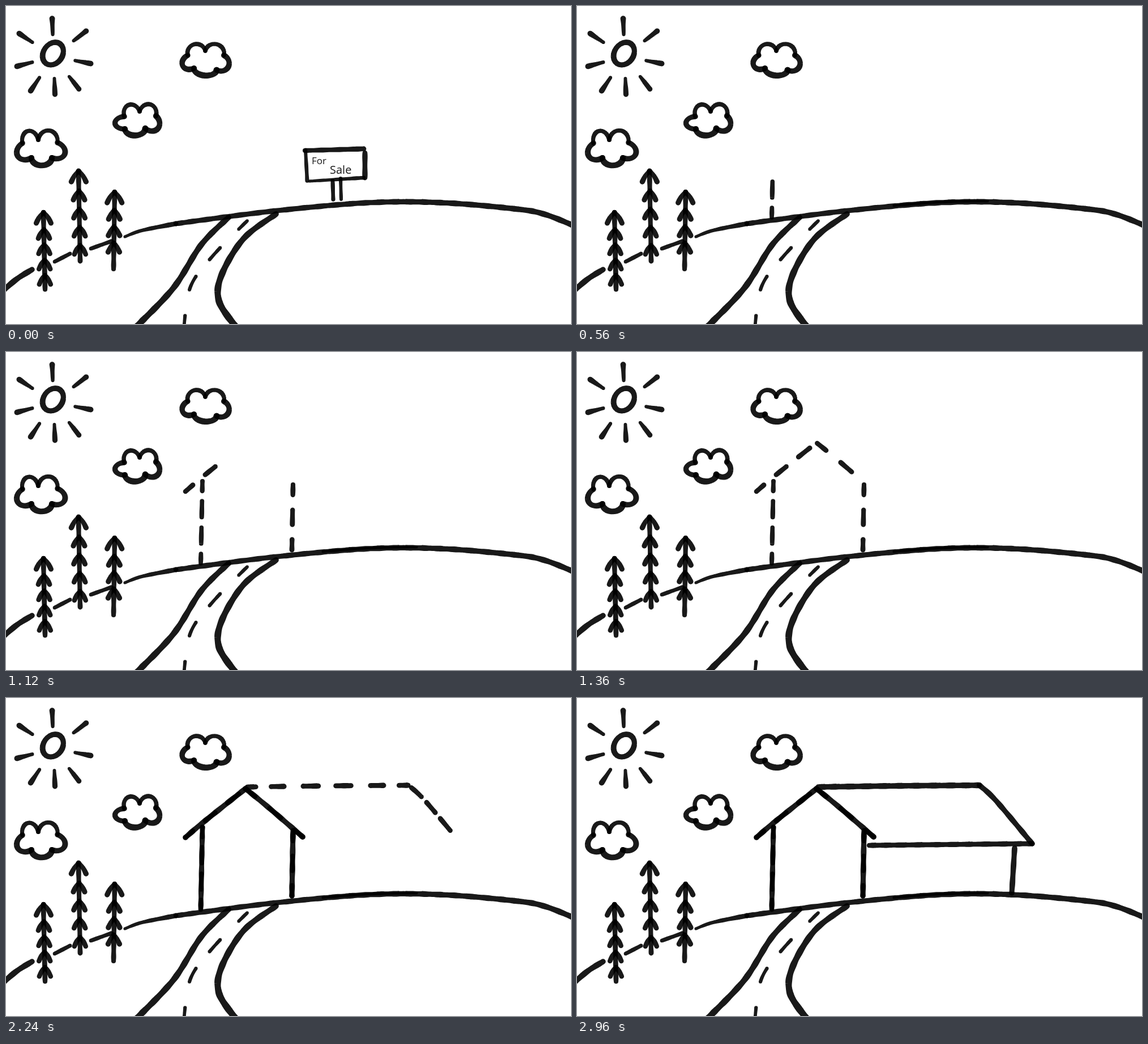
Animation of 998 by 561 pixels, one loop 3060 ms. Source, as an HTML page with a canvas:

```html
<!DOCTYPE html>
<html lang="en">
<head>
<meta charset="utf-8">
<title>House on the hill</title>
<style>
  html, body { margin: 0; width: 998px; height: 561px; overflow: hidden; background: #fff; }
  canvas { display: block; }
</style>
</head>
<body>
<canvas id="stage" width="998" height="561"></canvas>
<script>
const ctx = document.getElementById('stage').getContext('2d');
const LOOP = 3060, STEP = 80, LAST = 37;
const FIRST_DASH = 6, FRONT_DONE = 19, SIGN_GONE = 5;
const INK = 'rgba(0,0,0,.9)';
const { PI, sin, cos, hypot } = Math;

const range = (n, make) => Array.from({ length: n }, (_, i) => make(i));
const parse = text => text.split(' ').map(s => s.split(',').map(Number));

// Catmull-Rom curve through the points of "x,y x,y ..."
function smooth(text) {
  const p = parse(text), out = [];
  for (let i = 0; i < p.length - 1; i++) {
    const a = p[i - 1] || p[i], b = p[i], c = p[i + 1], d = p[i + 2] || c;
    const n = Math.max(2, Math.ceil(hypot(c[0] - b[0], c[1] - b[1]) / 3));
    for (let j = 0; j < n; j++) {
      const t = j / n;
      out.push([0, 1].map(k => b[k] + .5 * t * (c[k] - a[k]
        + t * (2 * a[k] - 5 * b[k] + 4 * c[k] - d[k]
        + t * (3 * (b[k] - c[k]) + d[k] - a[k])))));
    }
  }
  return [...out, p[p.length - 1]];
}

// One pen stroke whose width runs from w0 to w1, with a slight wobble
function pen(pts, w0, w1 = w0) {
  const path = new Path2D(), end = pts.length - 1;
  const radius = i => (w0 + (w1 - w0) * i / end) / 2 * (1 + .05 * sin(i * .7 + pts[0][0]));
  pts.forEach(([x, y], i) => {
    const r = radius(i);
    path.moveTo(x + r, y);
    path.arc(x, y, r, 0, 2 * PI);
    if (i === end) return;
    const [u, v] = pts[i + 1], q = radius(i + 1);
    const len = hypot(u - x, v - y) || 1;
    const nx = (v - y) / len, ny = (x - u) / len;
    path.moveTo(x + nx * r, y + ny * r);
    path.lineTo(u + nx * q, v + ny * q);
    path.lineTo(u - nx * q, v - ny * q);
    path.lineTo(x - nx * r, y - ny * r);
    path.closePath();
  });
  return path;
}

const stroke = (text, w0, w1) => pen(smooth(text), w0, w1);

// n equal dashes spread over the part of a line between two fractions
function dashes(text, width, n, from = 0, to = 1, size = 23) {
  const pts = smooth(text), end = pts.length - 1;
  const total = pts.slice(1).reduce((sum, [x, y], i) => sum + hypot(x - pts[i][0], y - pts[i][1]), 0);
  const part = size / total, gap = (to - from - part) / (n - 1);
  return range(n, i => {
    const start = from + i * gap;
    return pen(pts.slice(Math.round(start * end), Math.round((start + part) * end) + 1), width);
  });
}

function makeSun(x, y) {
  const ring = range(25, i => {
    const a = i * PI / 12;
    return [x + 18 * cos(a) - 4 * sin(a), y + 20 * sin(a)];
  });
  const rays = range(8, i => {
    const turn = i * PI / 4, a = .19 + turn - .227 * (1 - cos(turn));
    const inner = 39 + i % 2 * 6;
    const at = r => [x + 1 + r * cos(a), y + 5 + r * sin(a)];
    return pen(range(10, j => at(inner + j * 3.1)), 6, 9.5);
  });
  return [pen(ring, 9.5), ...rays];
}

// Puffs bulge outwards between neighbouring joints; lower ones are heavier
function makeCloud(puff, text) {
  const joints = parse(text);
  return joints.map(([x, y], i) => {
    const [u, v] = joints[(i + 1) % joints.length];
    const len = hypot(u - x, v - y);
    const nx = (v - y) / len, ny = (x - u) / len;
    const bulge = puff * (ny > .8 ? .7 : 1);
    return pen(range(17, j => {
      const a = j * PI / 16, along = (1 - cos(a)) / 2, out = bulge * sin(a);
      return [x + (u - x) * along + nx * out, y + (v - y) * along + ny * out];
    }), 9 + 1.5 * ny);
  });
}

function makeTree(x, y, lean, height, tiers, gap) {
  const trunk = stroke(`${x},${y} ${x + lean},${y + height}`, 8.5);
  const branches = range(tiers * 2, i => {
    const tier = i >> 1, side = i % 2 ? 1 : -1;
    const base = y + 20 + tier * gap, mid = x + lean * (base - y) / height;
    const reach = side * (tier ? 10 : 13), rise = tier ? 17 : 20;
    return stroke(`${mid},${base - rise} ${mid + reach * .6},${base - rise * .55} ${mid + reach},${base - 1}`, 8, 9);
  });
  return [trunk, ...branches];
}

const scenery = [
  ...makeSun(83, 84),
  ...makeCloud(16, '321,87 352,79 385,87 372,113 332,110'),
  ...makeCloud(17, '209,195 236,186 265,194 246,216 210,217'),
  ...makeCloud(19, '29,242 57,236 91,241 81,268 45,268'),
  ...makeTree(66, 364, 3, 136, 5, 27),
  ...makeTree(128, 291, 3, 159, 5, 32),
  ...makeTree(192, 328, -2, 136, 4, 29),
  stroke('-4,501 20,481 46,465', 10),
  stroke('86,451 113,437', 7),
  stroke('150,428 186,415', 7),
  stroke('210,407 240,396 300,384', 5, 9),
  stroke('300,384 470,362 640,347 770,347 900,358 950,367 1002,387', 9, 10),
  stroke('393,373 345,421 296,497 232,564', 10, 11),
  stroke('477,367 420,410 381,474 376,520 405,565', 10, 12),
  ...dashes('426,379 366,440 326,495 314,568', 6, 4, 0, 1, 28)
];

const sign = [
  stroke('528,255 632,252', 8, 9),
  stroke('529,254 532,308', 6, 7),
  stroke('634,259 634,303', 9),
  stroke('536,309 632,303', 5, 7),
  stroke('577,308 578,341', 7),
  stroke('591,304 592,341', 6)
];

const newGround = stroke('560,352 640,346 725,344', 5);

// Each part: line, width, dash count and the dashed stretch of the line
const front = [
  ['344,373 347,228', 9, 4],
  ['507,234 505,349', 9.5, 3],
  ['317,246 350,218 423,160', 9.5, 3, 0, .85],
  ['423,160 460,190 524,245', 9.5, 3, .03]
];
const barn = [
  ['426,157 570,155 710,154', 10, 6],
  ['711,154 740,181 804,257', 9.5, 4, .08],
  ['804,257 700,258 516,260', 9, 5],
  ['773,265 768,344', 9.5, 2]
];

const solid = parts => parts.map(([line, width]) => stroke(line, width));
const dashed = parts => parts.flatMap(([line, width, ...rest]) => dashes(line, width - 1, ...rest));
const frontLines = solid(front), frontDashes = dashed(front);
const barnLines = solid(barn), barnDashes = dashed(barn);

const draw = list => list.forEach(path => ctx.fill(path));
const firstOf = (list, n) => list.slice(0, Math.max(0, n));

// The sign is rubbed out from the top down
function drawSign(step) {
  draw(sign);
  ctx.font = '17px "Open Sans", sans-serif';
  ctx.fillText('For', 540, 279);
  ctx.font = '20px "Open Sans", sans-serif';
  ctx.fillText('Sale', 572, 296);
  if (!step) return;
  const edge = 240 + step * 21.5;
  const fade = ctx.createLinearGradient(0, edge - 5, 0, edge + 6);
  fade.addColorStop(0, '#fff');
  fade.addColorStop(1, 'rgba(255,255,255,0)');
  ctx.fillStyle = fade;
  ctx.fillRect(515, 240, 130, 110);
  ctx.fillStyle = INK;
}

function render(step) {
  ctx.fillStyle = '#fff';
  ctx.fillRect(0, 0, 998, 561);
  ctx.fillStyle = INK;
  if (step < SIGN_GONE) drawSign(step);
  draw(scenery);
  if (step >= SIGN_GONE) ctx.fill(newGround);
  draw(firstOf(frontDashes, step - FIRST_DASH + 1));
  if (step >= FRONT_DONE) draw(frontLines);
  draw(step === LAST ? barnLines : firstOf(barnDashes, step - FRONT_DONE));
}

const start = performance.now();
let shown = -1;
function tick() {
  const time = (performance.now() - start) % LOOP;
  const step = Math.min(LAST, Math.floor(time / STEP));
  if (step !== shown) render(shown = step);
  requestAnimationFrame(tick);
}
tick();
</script>
</body>
</html>
```
